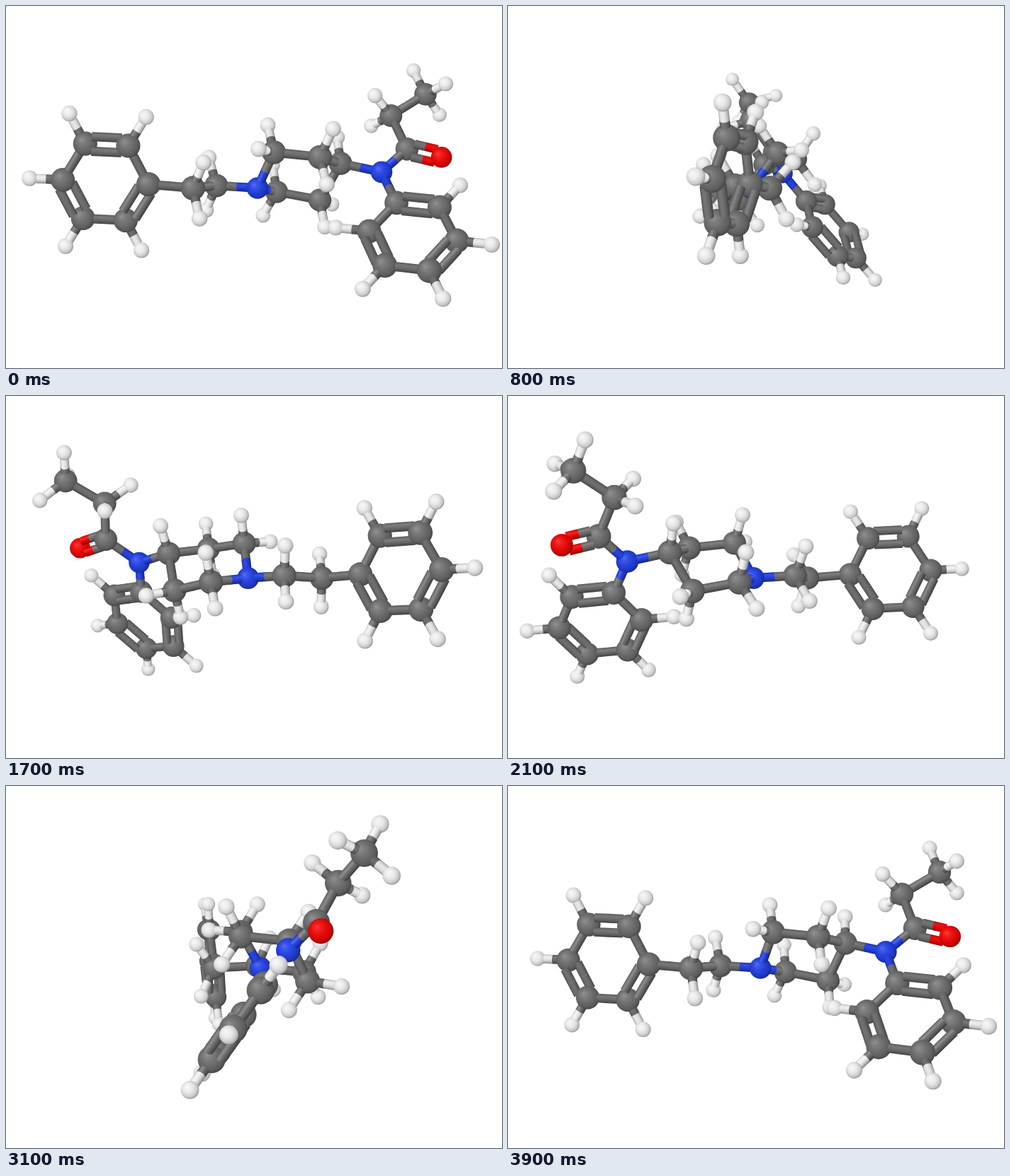
These frames come from a looping animation (700x512 px, 4000 ms). An HTML page with a canvas:

```html
<!DOCTYPE html>
<html lang="en">
<head>
<meta charset="utf-8">
<title>Rotating molecule</title>
<style>
html, body { margin: 0; width: 100%; height: 100%; overflow: hidden; background: #fff; }
canvas { display: block; }
</style>
</head>
<body>
<canvas id="stage" width="700" height="512"></canvas>
<script>
const ctx = document.getElementById('stage').getContext('2d');
const CAMERA = 1700, BOND_RADIUS = 6.4, CH = 47;
const LIGHT = [-0.35, -0.35, 0.87];
const ELEMENTS = {
  C: { radius: 16.7, rgb: [112, 112, 112] },
  H: { radius: 10.9, rgb: [240, 240, 240] },
  N: { radius: 15.4, rgb: [36, 66, 230] },
  O: { radius: 15.2, rgb: [242, 6, 6] }
};

// Vectors
const plus = (a, b, k = 1) => a.map((v, i) => v + b[i] * k);
const minus = (a, b) => plus(a, b, -1);
const unit = a => a.map(v => v / Math.hypot(...a));
const dot = (a, b) => a[0] * b[0] + a[1] * b[1] + a[2] * b[2];
const cross = (a, b) => [
  a[1] * b[2] - a[2] * b[1], a[2] * b[0] - a[0] * b[2], a[0] * b[1] - a[1] * b[0]
];

// Molecule
const atoms = [], bonds = [];

function atom(element, pos) {
  const a = { ...ELEMENTS[element], pos, links: [] };
  atoms.push(a);
  return a;
}
function bond(a, b, order = 1) {
  bonds.push({ a, b, order });
  a.links.push(b);
  b.links.push(a);
}
const hydrogen = (a, dir) => bond(a, atom('H', plus(a.pos, unit(dir), CH)));

// Six-membered aromatic ring; returns the atom that joins the rest.
function phenyl(center, u, w) {
  const at = (k, scale) =>
    plus(plus(center, u, -scale * Math.cos(k * Math.PI / 3)), w, scale * Math.sin(k * Math.PI / 3));
  const ring = [0, 1, 2, 3, 4, 5].map(k => atom('C', at(k, 1)));
  ring.forEach((a, k) => {
    bond(a, ring[(k + 1) % 6], k % 2 ? 1 : 2);
    if (k) bond(a, atom('H', at(k, 1.78)));
  });
  return ring[0];
}

// Fills the free tetrahedral places of a carbon with two or three links.
function saturate(a) {
  const dirs = a.links.map(l => unit(minus(l.pos, a.pos)));
  const away = unit(dirs.reduce((sum, d) => minus(sum, d), [0, 0, 0]));
  if (dirs.length === 3) return hydrogen(a, away);
  const side = unit(cross(dirs[0], dirs[1]));
  for (const k of [1.405, -1.405]) hydrogen(a, plus(away, side, k));
}

// Staggered methyl group on the chain before - middle - end.
function methyl(before, middle, end) {
  const axis = unit(minus(end.pos, middle.pos));
  const first = unit(minus(middle.pos, before.pos));
  const along = dot(first, axis);
  const across = plus(first, axis, -along), side = cross(axis, across);
  for (let k = 0; k < 3; k++) {
    const t = k * 2 * Math.PI / 3;
    hydrogen(end, axis.map((v, i) => v * along + across[i] * Math.cos(t) + side[i] * Math.sin(t)));
  }
}

const leftRing = phenyl([-205.3, -6.8, 35], [-59.7, -3, -4], [-2.6, 59.7, -5.8]);
const rightRing = phenyl([216.7, 67, 53.5], [17.8, 44.9, 35.5], [56.6, -19.1, -3.5]);
const chainB = atom('C', [-83.8, 1.5, 46.5]);
const chainA = atom('C', [-53.6, -2, -13]);
const amine = atom('N', [5, 1.5, -8.5]);
const upper1 = atom('C', [27.6, -48.5, 23]);
const upper2 = atom('C', [91.4, -41.5, 32]);
const hub = atom('C', [124, -34, -27]);
const lower2 = atom('C', [96.1, 19, -57.5]);
const lower1 = atom('C', [33.2, 7, -65.5]);
const amide = atom('N', [181.6, -21.3, -15]);
const carbonyl = atom('C', [221.4, -55, -43]);
const oxygen = atom('O', [270.5, -43, -38]);
const ethyl1 = atom('C', [201.8, -105.5, -75]);
const ethyl2 = atom('C', [255.5, -138.5, -95]);

const chain = [leftRing, chainB, chainA, amine, upper1, upper2, hub, lower2, lower1, amine];
chain.slice(1).forEach((a, i) => bond(chain[i], a));
bond(hub, amide);
bond(amide, rightRing);
bond(amide, carbonyl);
bond(carbonyl, oxygen, 2);
bond(carbonyl, ethyl1);
bond(ethyl1, ethyl2);
[chainB, chainA, upper1, upper2, hub, lower2, lower1, ethyl1].forEach(saturate);
methyl(carbonyl, ethyl1, ethyl2);

// Drawing
function project([x, y, z]) {
  const k = CAMERA / (CAMERA - z);
  return { x: 350 + x * k, y: 256 + y * k, k };
}

function shade(rgb, light) {
  const i = Math.max(0, light), gloss = 0.22 * i ** 16;
  const parts = rgb.map(v => {
    const lit = v * (0.56 + 0.46 * i);
    return Math.round(Math.min(255, lit + (255 - lit) * gloss));
  });
  return `rgb(${parts})`;
}

function drawSphere(a) {
  const { x, y, k } = project(a.view), r = a.radius * k;
  const fill = ctx.createRadialGradient(x - 0.35 * r, y - 0.35 * r, 0, x - 0.1 * r, y - 0.1 * r, 1.15 * r);
  [[0, 1], [0.25, 0.95], [0.5, 0.87], [0.8, 0.6], [1, 0.12]]
    .forEach(([t, light]) => fill.addColorStop(t, shade(a.rgb, light)));
  ctx.fillStyle = fill;
  ctx.beginPath();
  ctx.arc(x, y, r, 0, 2 * Math.PI);
  ctx.fill();
}

// Cylinder between two points, shifted sideways on screen.
function drawCylinder(from, to, rgb, shift, angle) {
  const p = project(from), q = project(to);
  const length = Math.hypot(q.x - p.x, q.y - p.y);
  const r0 = BOND_RADIUS * p.k, r1 = BOND_RADIUS * q.k;
  const tilt = Math.abs(unit(minus(to, from))[2]);
  const sideLight = LIGHT[1] * Math.cos(angle) - LIGHT[0] * Math.sin(angle);
  const fill = ctx.createLinearGradient(0, -r0, 0, r0);
  for (const t of [-1, -0.8, -0.4, 0, 0.4, 0.8, 1]) {
    const light = sideLight * t + LIGHT[2] * Math.sqrt(1 - t * t);
    fill.addColorStop((t + 1) / 2, shade(rgb, light));
  }
  ctx.save();
  ctx.translate(p.x, p.y);
  ctx.rotate(angle);
  ctx.translate(0, shift);
  ctx.fillStyle = fill;
  ctx.beginPath();
  ctx.ellipse(0, 0, tilt * r0, r0, 0, Math.PI / 2, 3 * Math.PI / 2);
  ctx.ellipse(length, 0, tilt * r1, r1, 0, -Math.PI / 2, Math.PI / 2);
  ctx.fill();
  ctx.restore();
}

// One coloured half of a bond, from the surface of a to the middle.
function halfBond(a, b, order) {
  const dir = unit(minus(b.view, a.view));
  const from = plus(a.view, dir, a.radius * (order === 2 ? 0.55 : 0.9));
  const to = plus(a.view, minus(b.view, a.view), 0.5);
  const p = project(a.view), q = project(b.view);
  const angle = Math.atan2(q.y - p.y, q.x - p.x);
  const step = BOND_RADIUS * (p.k + q.k) + Math.hypot(q.x - p.x, q.y - p.y) / 8;
  const shifts = order === 2 ? [-step / 2, step / 2] : [0];
  return {
    z: (from[2] + to[2]) / 2,
    draw: () => shifts.forEach(shift => drawCylinder(from, to, a.rgb, shift, angle))
  };
}

function render(angle) {
  const c = Math.cos(angle), s = Math.sin(angle);
  for (const a of atoms) {
    const [x, y, z] = a.pos;
    a.view = [x * c + z * s, y, z * c - x * s];
  }
  const parts = atoms.map(a => ({ z: a.view[2], draw: () => drawSphere(a) }));
  for (const { a, b, order } of bonds) parts.push(halfBond(a, b, order), halfBond(b, a, order));
  ctx.fillStyle = '#fff';
  ctx.fillRect(0, 0, 700, 512);
  parts.sort((m, n) => m.z - n.z).forEach(part => part.draw());
}

// 40 steps of 9 degrees, 100 ms each.
let shown = -1;
function tick() {
  const step = Math.floor(performance.now() / 100) % 40;
  if (step !== shown) render(step * Math.PI / 20);
  shown = step;
  requestAnimationFrame(tick);
}
tick();
</script>
</body>
</html>
```
